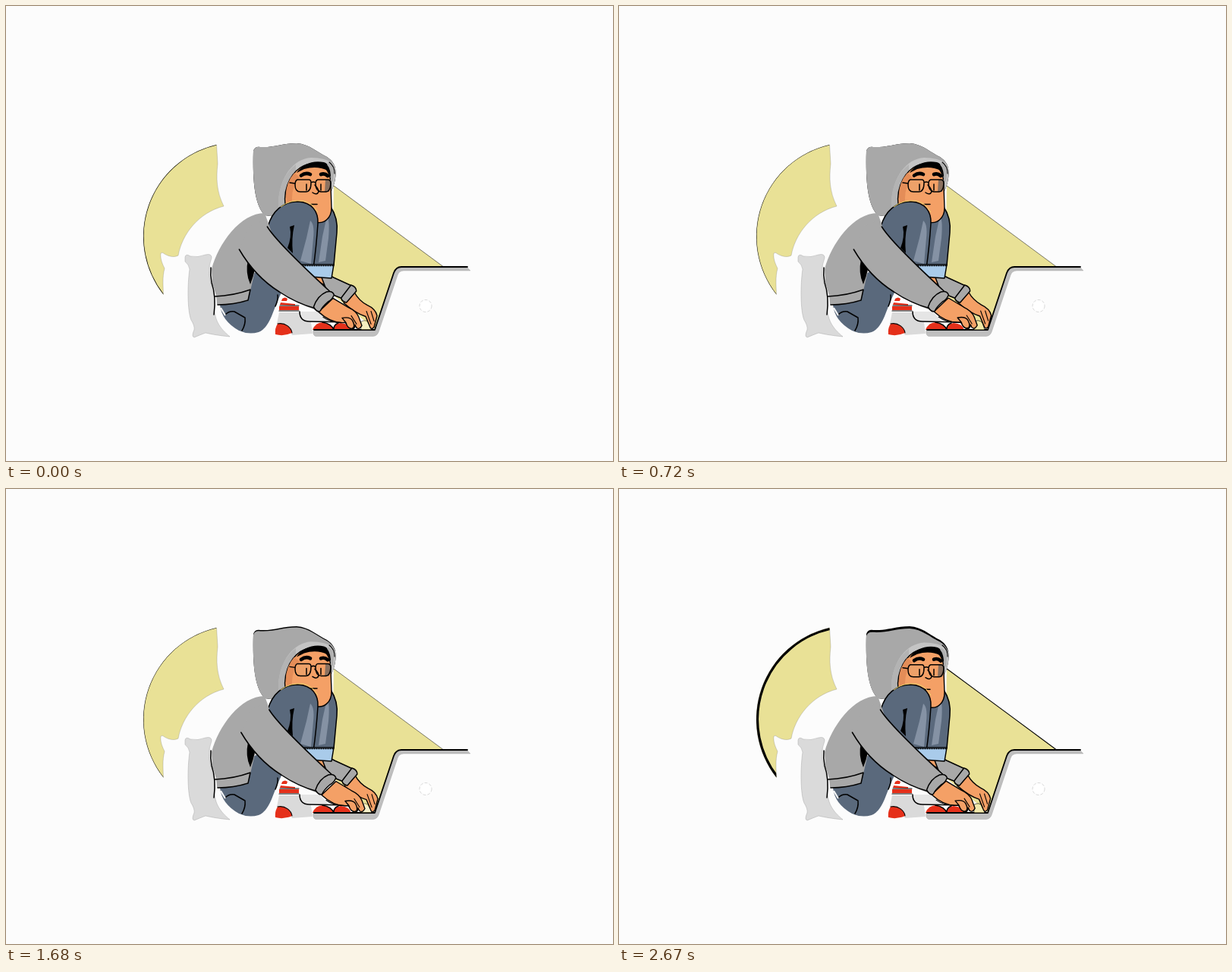
An HTML page for the animation above (2.7 s loop, 800 by 600 pixels).

```html
<!DOCTYPE html>
<html lang="en">
<head>
<meta charset="utf-8">
<title>Night typing</title>
<style>
html, body { margin: 0; width: 100%; height: 100%; overflow: hidden; background: #fcfcfc; }
svg { display: block; width: 800px; height: 600px; }
.ln { fill: none; stroke: #000; stroke-width: 1.5; stroke-linecap: round; stroke-linejoin: round; }
.skin { fill: #f4a066; stroke: #000; stroke-width: 1.4; stroke-linejoin: round; }
.cloth { fill: #a8a8a8; }
.edged { stroke: #000; stroke-width: 1.5; stroke-linejoin: round; }
.jean { fill: #5a697c; }
.shine { fill: #8592a4; }
.red { fill: #e5301a; }
.thin { stroke-width: 1.1; }
</style>
</head>
<body>
<svg viewBox="0 0 800 600">
  <defs>
    <path id="glow" d="M277.500 183 A124 124 0 0 0 207.500 380.500 C207 369 206 357 209 346 C206 340 203 333 204 326 Q206 324 209 327 C214 330 221 332 227 329 C232 300 255 272 287 264 C277 244 277 226 279 208 Z"/>
    <path id="hoodShape" d="M326 191 Q328 185 335 186 C353 187 365 181 383 181 C400 182 410 193 423 199 C432 205 435 212 434.500 222 C434 232 431 240 428 246 L372 280 L341 276 C327 262 325 228 326 191 Z"/>
    <clipPath id="glowClip"><use href="#glow"/></clipPath>
  </defs>

  <!-- light -->
  <use href="#glow" fill="#e9e196" stroke="#777" stroke-width=".3"/>
  <path id="ring" clip-path="url(#glowClip)" fill="none" stroke="#000" d="M277.500 183 A124 124 0 0 0 207.500 380.500"/>
  <path fill="#e9e196" d="M432 237 L576 343.500 L520 346 L487 427 L420 372 L430 330 Z"/>
  <path id="edge" class="ln" d="M432 237 L576 343.500"/>

  <!-- cat -->
  <path fill="#dadada" stroke="#999" stroke-width=".4" d="M236 331 Q237 326 243 330 Q253 332 263 328 Q271 326 271 332 Q267 342 268 351 C267 363 274 374 275 391 C273 414 282 425 295 436 Q275 434 263 431 Q255 434 248 437 Q244 436 248 427 Q249 422 244 414 C239 402 239 368 242 347 Q241 341 236 337 Z"/>

  <!-- socks and shoes -->
  <path fill="#fff" d="M362 378 L390 387 L387 404 L360 404 Z"/>
  <path class="red" d="M364 386 Q368 383 371 386 L370 389 L363 389 Z M362 391 L381 393 L381 395 L361 394 Z M360 396 L386 396 L386 401 L360 401 Z"/>
  <path class="ln thin" d="M361 395 H386 M360 402 H386"/>
  <path fill="#dadada" d="M360 404 H388 Q388 417 402 417 L404 432 L377 434 Q370 420 357 419 Z"/>
  <path class="red" d="M358 419 C368 417 376 424 377 431 Q366 436 355 433 Q354 425 358 419 Z"/>
  <path class="ln thin" d="M358 419 C368 417 376 424 377 431"/>
  <path fill="#e5e5e5" d="M388 403 H414 L426 417 H400 Q388 415 388 403 Z"/>
  <path class="red" d="M404 427 Q408 417 418 417 Q429 419 432 427 Z M432 427 Q432 419 441 418 Q453 419 455 427 Z"/>
  <path class="ln" d="M417 417 Q429 419 432 427 Q431 421 438 418"/>
  <path class="ln" d="M387 403 Q387 416 400 416 L452 417"/>
  <path class="skin" d="M405 354 L421 357 L420 368 L408 362 Z"/>

  <!-- laptop -->
  <path fill="#fcfcfc" d="M488 436 L516 349 L612 347 L612 436 Z"/>
  <path fill="#bfbfbf" stroke="#999" stroke-width=".4" d="M405 428 H486 L511 352 Q514 345 521 345 H608 L612 349 H524 Q518 349 516 355 L491 430 Q489 435 484 435.500 H408 Q404 434 405 428 Z"/>
  <path class="ln" d="M406 427 H486 L511 352 Q514 344 521 344 H608" style="stroke-width:1.800"/>
  <circle cx="553" cy="395.500" r="8" fill="#fff" stroke="#c8c8c8" stroke-width=".7" stroke-dasharray="4 2"/>
  <path id="key" fill="#f1e7a4" stroke="#000" stroke-width=".7" d="M467 417 Q474 412 479 418 L482 427 H468 Z"/>

  <!-- far arm -->
  <g id="farArm">
    <g id="farHand">
      <path class="skin" d="M446 391 L460 377 Q466 388 477 394 Q488 399 490 408 L486 423 Q482 428 480 421 L475 409 Q462 405 446 391 Z"/>
      <path class="ln thin" d="M476 402 L482 419 M482 402 L486 415"/>
    </g>
    <path class="cloth edged" d="M414 352 Q424 353 432 358 L456 369 L444 386 L424 378 Z"/>
    <path class="cloth edged" d="M455 368 Q462 370 462 376 L449 391 Q443 390 442 385 Z"/>
  </g>

  <!-- far leg -->
  <path class="jean edged" d="M405 270 L428 265 Q438 280 436 299 L432 342 H400 Z"/>
  <path class="shine" d="M423 277 Q427 282 425 306 L421 336 L412 338 L417 304 Z"/>

  <!-- head -->
  <use href="#hoodShape" fill="#000"/>
  <g id="hood">
    <use href="#hoodShape" class="cloth"/>
    <path fill="#c4c4c4" d="M359 266 C358 232 375 202 402 200 Q420 200 430 207 Q435 213 434 224 Q433 234 429 244 L371 262 Z"/>
    <path fill="#b3b3b3" d="M359 266 C358 240 367 220 382 209 L382 222 L370 264 Z"/>
  </g>
  <g id="face">
    <path class="skin" d="M369 266 C364 246 373 223 388 213 Q402 205 416 210 Q428 217 428 236 L429 266 C429 279 420 288 408 285 Z"/>
    <path fill="#e48d58" d="M369 252 Q368 234 380 220 L387 226 Q376 238 377 257 L371 260 Z"/>
    <path d="M383 220 C390 208 405 203 419 206 Q429 209 428 226 L424 217 Q410 210 393 215 Z"/>
    <path fill="#b0b0b0" d="M425 207 Q434 211 431 232 L428 230 Q429 216 423 209 Z"/>
    <path class="ln" d="M389 223.500 Q395 219 401 222 M415 222 Q420 220 424 224" style="stroke-width:4.600"/>
    <path fill="#e8a26b" fill-opacity=".55" d="M382 230 H401 L399 245 H386 Z"/>
    <path fill="#8a7160" d="M421 229 H428 L426 245 H420 Z"/>
    <path class="ln" d="M374 233 L381 234 M384 229 H399 Q402 229 402 233 Q402 245 395 245 H388 Q381 245 381 236 Q381 230 384 229 Z M411 229 H424 Q428 229 428 234 Q427 245 422 245 H415 Q408 244 408 234 Q408 230 411 229 Z M402 233 Q405 231 408 233"/>
    <path class="ln" d="M407 236 Q412 241 412 245 Q410 250 404 246 M402 261.500 H410"/>
    <path class="ln" id="eyes"/>
  </g>
  <path class="ln thin" d="M426 206 Q433 211 433 221"/>

  <!-- near leg -->
  <path class="jean" d="M322 355 L340 345 L364 376 Q358 388 352 404 Q344 426 333 430 Q320 434 307 428 Q284 415 282 394 L318 389 Z"/>
  <path class="jean edged" d="M345 291 C351 270 365 258 385 258 C403 259 412 271 411 287 Q409 318 405 346 L385 360 L350 330 Z"/>
  <path class="shine" d="M401 283 Q407 288 405 306 L402 340 L388 336 L396 306 Z"/>
  <path d="M374 291 L380 289 Q376 306 378 326 L371 319 Q377 304 374 291 Z"/>
  <path fill="none" stroke="#ecd068" d="M362 265 Q374 255 392 257 Q405 260 411 272"/>
  <path fill="#a9cbea" class="edged" d="M388 341 H432 L429 359 L402 357 Z"/>
  <path class="ln" d="M391 342.500 H432" stroke-dasharray="1 2"/>
  <path class="ln" d="M289 407 Q294 402 301 403 L315 411 Q316 420 311 428 M358 381 Q359 387 355 396"/>
  <path fill="none" stroke="#fcfcfc" stroke-width="2" d="M283 398 L289 408"/>

  <!-- torso -->
  <path class="cloth" d="M341 273 L347 290 L372 360 L328 350 L319 388 Q300 394 278 394 Q278 381 272 366 L271 347 C280 313 309 273 341 273 Z"/>
  <path class="ln" d="M270 345 Q269 355 271 365 C276 379 276 392 274 407 M275 383 Q300 382 322 374 L319 388 Q300 394 279 394"/>
  <path d="M319 334 Q315 352 322 367 Q326 357 328 347 Z"/>

  <!-- near arm -->
  <g id="arm">
    <g id="hand">
      <path class="skin" d="M413 403 L432 385 Q442 391 452 397 Q463 402 466 410 L470 421 Q467 427 463 424 L461 420 Q461 427 455 425 L448 417 Q430 419 413 403 Z"/>
      <path class="skin" d="M444 411 Q455 409 458 415 Q462 423 457 425 Q451 425 449 417 Z"/>
      <path class="ln thin" d="M456 408 L463 419 M448 417 Q430 418 419 410"/>
    </g>
    <path class="cloth" d="M341 282 L345 291 C352 303 372 325 427 376 L409 401 Q383 392 361 377 Q329 357 308 321 L322 290 Z"/>
    <path class="ln" d="M345 291 C352 303 372 325 427 376 M409 399 Q383 392 361 377 Q329 357 308 321"/>
    <path class="cloth edged" d="M423 377 Q431 375 433 381 Q430 388 425 390 Q417 397 415 402 Q411 405 406 397 Q411 382 423 377 Z"/>
  </g>
</svg>
<script>
const LOOP = 2700, TAU = Math.PI * 2;
const el = id => document.getElementById(id);
const smooth = (a, b, t) => {
  const v = Math.max(0, Math.min(1, (t - a) / (b - a)));
  return v * v * (3 - 2 * v);
};
// sharp pulse, count times per loop, peaking at the given time
const pulse = (t, count, peak, sharp) =>
  Math.pow(.5 + .5 * Math.cos(TAU * count * (t - peak) / LOOP), sharp);
const move = (id, x, y) => el(id).setAttribute("transform", `translate(${x} ${y})`);

function draw(t) {
  const flick = pulse(t, 12, 185, 9);
  el("ring").style.strokeWidth = .9 + 6.600 * flick;
  el("edge").style.strokeWidth = .5 + .7 * flick;

  // the hood sinks around its lower rim
  const drop = 3 * smooth(1250, 2100, t);
  const s = 1 - drop / 95;
  el("hood").setAttribute("transform", `translate(0 ${276 * (1 - s)}) scale(1 ${s})`);
  move("face", 0, drop * .9);

  const blink = smooth(980, 1070, t) - smooth(1100, 1190, t);
  const h = 4 * (1 - .9 * blink);
  el("eyes").setAttribute("d", [396, 415].map(x => `M${x} ${239 - h} V${239 + h}`).join(" "));

  const sway = 3.3 * Math.sin(Math.PI * t / LOOP) - .8;
  const tap = pulse(t, 7, 75, 3);
  move("arm", sway * .8, 0);
  move("hand", sway * .5, 1.2 * tap);
  move("farArm", sway * .4, 0);
  move("farHand", -2 * tap, 1.5 * tap);
  el("key").style.opacity = 1 - tap;
}

function tick() {
  draw(performance.now() % LOOP);
  requestAnimationFrame(tick);
}
tick();
</script>
</body>
</html>
```
